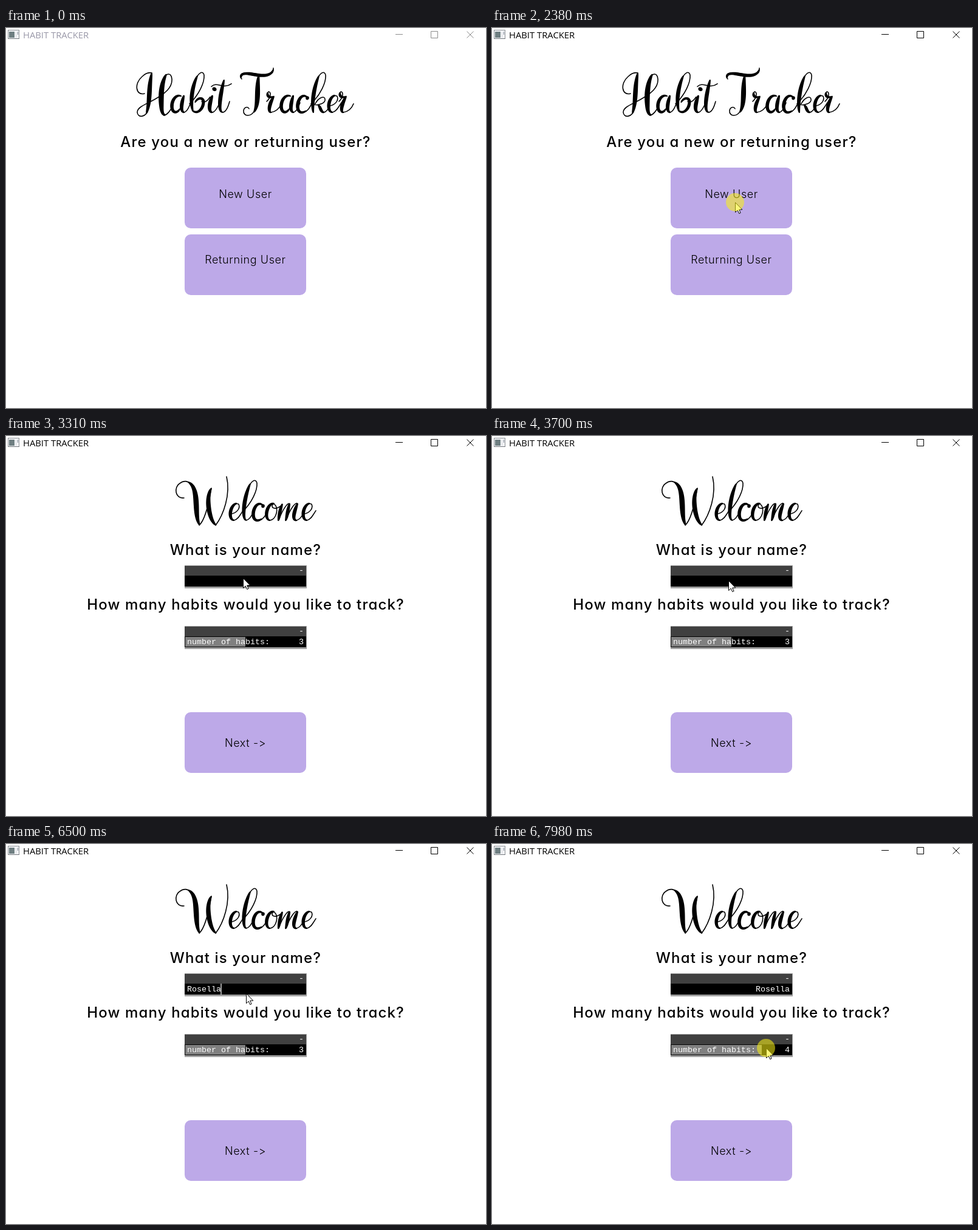
Recreate the animation shown at these times as an HTML page. Size 790 by 626 pixels, loop 8 s.

```html
<!DOCTYPE html>
<html lang="en">
<head>
<meta charset="utf-8">
<title>Habit Tracker</title>
<style>
html, body { margin: 0; width: 100%; height: 100%; overflow: hidden; background: #fff; }
svg { display: block; width: 790px; height: 626px; }
.bar { font: 14.8px "Open Sans", sans-serif; }
.ask, .label {
  font-family: Inter, sans-serif;
  font-feature-settings: "cv11" 1, "calt" 0;
  text-anchor: middle;
}
.ask { font-size: 24px; font-weight: 500; letter-spacing: 1.15px; }
.label { font-size: 18px; font-weight: 300; letter-spacing: .6px; }
.mono { font: 13.33px "Liberation Mono", monospace; fill: #fff; white-space: pre; }
.end { text-anchor: end; }
.hair { fill: none; stroke: #000; stroke-width: 1.6; stroke-linecap: round; }
</style>
</head>
<body>
<svg id="stage" viewBox="0 0 790 626">
  <rect width="790" height="626" fill="#fff"/>
  <g>
    <rect x="3.5" y="3.5" width="18" height="14" fill="#f4f5f8" stroke="#8b8f94"/>
    <path d="M4 17.5H22" stroke="#70757a"/>
    <rect x="5" y="6" width="9" height="10" fill="#6f7f82"/>
    <path d="M16.5 6V16" stroke="#d5d8dc"/>
    <path d="M19.5 6V11" stroke="#7b8690"/>
  </g>
  <text id="caption" class="bar" x="28" y="17">HABIT TRACKER</text>
  <path id="controls" fill="none" d="M641 10.5H653M699.5 5.5H710.5V16.5H699.5ZM758.5 5.5L769.5 16.5M769.5 5.5L758.5 16.5"/>

  <g id="start">
    <g class="script" role="img" aria-label="Habit Tracker"></g>
    <text class="ask" x="394.5" y="196">Are you a new or returning user?</text>
    <rect x="294" y="230" width="200" height="100" rx="10" fill="#bda9e8"/>
    <text class="label" x="394" y="280">New User</text>
    <rect x="294" y="340" width="200" height="100" rx="10" fill="#bda9e8"/>
    <text class="label" x="394" y="388">Returning User</text>
  </g>

  <g id="welcome">
    <g class="script" role="img" aria-label="Welcome"></g>
    <text class="ask" x="394.5" y="196">What is your name?</text>
    <g class="panel" transform="translate(294 213)"></g>
    <text id="name" class="mono" y="243"></text>
    <rect id="caret" y="230" width="2" height="18" fill="#a0a0a0"/>
    <text class="ask" x="394.5" y="286">How many habits would you like to track?</text>
    <g class="panel" transform="translate(294 313)"></g>
    <rect id="fill" x="295" y="331" height="16" fill="#808080"/>
    <text class="mono" x="298" y="343">number of habits:</text>
    <text id="count" class="mono end" x="490" y="343"></text>
    <rect x="294" y="455" width="200" height="100" rx="10" fill="#bda9e8"/>
    <text class="label" x="394" y="512">Next -&gt;</text>
  </g>

  <g id="pointer">
    <path d="M.5 .5V16.6L4.2 13.1L6.7 18.6L9.1 17.5L6.7 12.1H11.8Z" fill="#fff" stroke="#000"/>
    <circle id="press" r="15" fill="#faf014" fill-opacity=".56"/>
  </g>
</svg>
<script>
const $ = id => document.getElementById(id);

function add(parent, tag, attrs) {
  const el = document.createElementNS('http://www.w3.org/2000/svg', tag);
  for (const key in attrs) el.setAttribute(key, attrs[key]);
  return parent.appendChild(el);
}

// Each letter: one hairline path, then [width, path] brush strokes.
const letters = {
  H: ['M228 108C214 112 210 92 224 80C230 74 236 73 240 74M234 134C231 147 217 149 216 139C216 130 230 126 244 118C262 108 274 98 273 84C272 72 262 74 259 86M260 144C266 143 270 136 275 128',
    [7, 'M240 74C234 100 238 120 231 141'], [8, 'M264 76C254 92 255 118 256 132C257 142 260 144 263 143']],
  a: ['M284 141C289 134 290 124 292 115M293 143C298 142 301 134 304 126',
    [5, 'M289 115C280 110 273 122 273 132C273 144 281 146 286 137'], [5.5, 'M293 113C289 126 286 143 294 143']],
  b: ['M302 128C318 112 327 90 326 78C325 70 316 72 312 88M322 124C328 127 332 122 336 116',
    [6, 'M315 79C305 100 303 130 308 141'], [4.5, 'M306 139C314 148 325 138 325 124C324 116 315 117 311 126']],
  i: ['M340 143C345 142 348 134 351 128',
    [6, 'M340 113C335 126 332 143 340 143'], [7, 'M345 100L341 105']],
  t: ['M338 98C348 88 356 104 371 93M357 143C362 142 366 132 368 124',
    [6, 'M359 86C354 106 347 143 357 143']],
  T: ['M388 84C384 80 385 74 394 74M432 76C439 76 440 72 440 66M410 134C404 148 390 146 391 136C392 130 398 129 400 133',
    [5, 'M387 82C386 70 406 77 418 78C430 79 438 76 440 68'], [7.5, 'M416 78C412 100 417 124 408 139']],
  r: ['M429 124C437 116 436 106 432 107C428 112 432 118 441 115M436 143C444 142 450 136 453 128',
    [4, 'M431 108C429 114 433 118 438 116'], [5.5, 'M441 115C434 126 430 144 437 143']],
  c: ['M490 143C497 141 500 134 504 126',
    [5, 'M496 117C488 108 479 122 480 134C481 146 490 144 494 140'], [5, 'M497 115L495 121']],
  k: ['M502 128C518 112 527 90 526 78C525 70 516 72 512 88M508 130C514 116 526 112 525 122C524 128 514 130 510 130M523 143C528 142 531 136 533 130',
    [6, 'M515 79C506 100 503 130 506 144'], [4.5, 'M513 130C518 132 517 143 524 143']],
  e: ['M532 132C542 130 548 122 545 115C540 110 532 122 532 132M537 143C544 142 548 132 552 126',
    [5, 'M542 113C530 116 527 143 538 143']],
  W: ['M293 102C278 104 276 84 286 78C294 72 301 75 305 80M318 147C328 138 334 110 338 86M345 147C358 130 370 96 363 67',
    [8, 'M300 76C320 86 308 130 319 147'], [7, 'M338 86C328 100 334 140 346 147']],
  l: ['M302 128C318 112 327 90 326 78C325 70 316 72 312 88M308 143C314 142 318 134 321 126',
    [6, 'M315 79C305 100 300 143 309 143']],
  o: ['M434 143C446 142 450 118 440 114C434 120 442 126 452 118',
    [5, 'M442 114C430 110 423 142 435 143']],
  m: ['M449 142C456 122 466 108 467 116M461 142C468 122 478 108 480 115M478 143C483 142 487 136 490 130',
    [5, 'M455 114C450 126 450 136 448 144'], [5, 'M467 113C463 126 463 136 460 144'], [5.5, 'M480 113C474 128 470 144 479 143']]
};

// Outline of a stroke that swells in the middle and tapers at both ends.
function brush(parent, [width, d]) {
  const path = add(parent, 'path', { d }), length = path.getTotalLength();
  const left = [], right = [], n = 28;
  const at = u => path.getPointAtLength(length * u);
  for (let i = 0; i <= n; i++) {
    const u = i / n, p = at(u), a = at(Math.max(0, u - .02)), b = at(Math.min(1, u + .02));
    const angle = Math.atan2(b.y - a.y, b.x - a.x);
    const half = .8 + (width / 2 - .5) * Math.sin(Math.PI * u) ** .6;
    const dx = Math.sin(angle) * half, dy = -Math.cos(angle) * half;
    left.push(`${p.x + dx} ${p.y + dy}`);
    right.unshift(`${p.x - dx} ${p.y - dy}`);
  }
  path.setAttribute('d', `M${left.concat(right).join('L')}Z`);
}

// Capitals hang a little below the line on which the small letters sit.
function script(page, text, shifts) {
  const parent = $(page).querySelector('.script');
  [...text].forEach((ch, i) => {
    const fit = ch === ch.toLowerCase() ? '.944 0 4' : '1 0 0';
    const [scale, , drop] = fit.split(' ');
    const g = add(parent, 'g', { transform: `matrix(1 0 0 ${scale} ${shifts[i]} ${drop})` });
    const [hair, ...strokes] = letters[ch];
    add(g, 'path', { d: hair, class: 'hair' });
    strokes.forEach(stroke => brush(g, stroke));
  });
}
script('start', 'HabitTracker', [0, 0, 0, 0, 0, 0, 0, 180, 0, 0, 0, 119]);
script('welcome', 'Welcome', [0, -162, 87, -73, 0, 0, -42]);

for (const panel of document.querySelectorAll('.panel')) {
  add(panel, 'rect', { width: 201, height: 38, fill: '#a0a0a0' });
  add(panel, 'rect', { y: 1, width: 200, height: 16, fill: '#404040' });
  add(panel, 'rect', { y: 17, width: 200, height: 18, fill: '#000' });
  add(panel, 'text', { x: 196, y: 12, class: 'mono end' }).textContent = '-';
}

const LOOP = 8000, NAME = 'Rosella';
const keyTimes = [4630, 4950, 5260, 5410, 5640, 5790, 6020];

// Pointer moves: first step, last step, number of steps, then from / bend / to.
const moves = [
  [670, 990, 5, [675, 648], [580, 558], [486, 468]],
  [1370, 1920, 8, [487, 471], [443, 382], [400, 287]],
  [2690, 3010, 5, [400, 287], [395, 258], [390, 232]],
  [3310, 3560, 4, [390, 232], [390, 235], [389, 238]],
  [6500, 7260, 11, [389, 238], [428, 280], [394, 335]],
  [7750, 7980, 4, [394, 335], [422, 336], [451, 336]]
];
const presses = [[2380, 2540], [3560, 3700], [7580, LOOP]];

function pointerAt(t) {
  const move = moves.filter(m => t >= m[0]).pop();
  if (!move) return null;
  const [begin, end, steps, from, bend, to] = move;
  const step = Math.floor((t - begin) / (end - begin) * (steps - 1) + .02);
  const p = Math.min(1, (step + 1) / steps), q = 1 - p;
  return from.map((v, i) => Math.round(q * q * v + 2 * p * q * bend[i] + p * p * to[i]));
}

const show = (id, on) => $(id).setAttribute('visibility', on ? 'visible' : 'hidden');

function draw(t) {
  const active = t >= 2380, second = t >= 2460, done = t >= 7580;
  $('caption').setAttribute('fill', active ? '#000' : '#9998a8');
  $('controls').setAttribute('stroke', active ? '#000' : '#8c8c8c');
  $('start').style.display = second ? 'none' : '';
  $('welcome').style.display = second ? '' : 'none';

  const typed = keyTimes.filter(k => t >= k).length;
  $('name').textContent = NAME.slice(0, typed);
  $('name').setAttribute('x', done ? 490 : 298);
  $('name').style.textAnchor = done ? 'end' : 'start';
  $('caret').setAttribute('x', 297 + 8 * typed);
  show('caret', t >= 4490 && t < 7430);

  const spot = pointerAt(t);
  show('pointer', spot);
  show('press', presses.some(([on, off]) => t >= on && t < off));
  if (spot) $('pointer').setAttribute('transform', `translate(${spot})`);

  const habits = done && spot[0] >= 444 ? 4 : 3;
  $('count').textContent = habits;
  $('fill').setAttribute('width', (habits - 1) * 50 - 1);
}

const origin = performance.now();
function tick() {
  draw((performance.now() - origin) % LOOP);
  requestAnimationFrame(tick);
}
draw(0);
requestAnimationFrame(tick);
</script>
</body>
</html>
```
